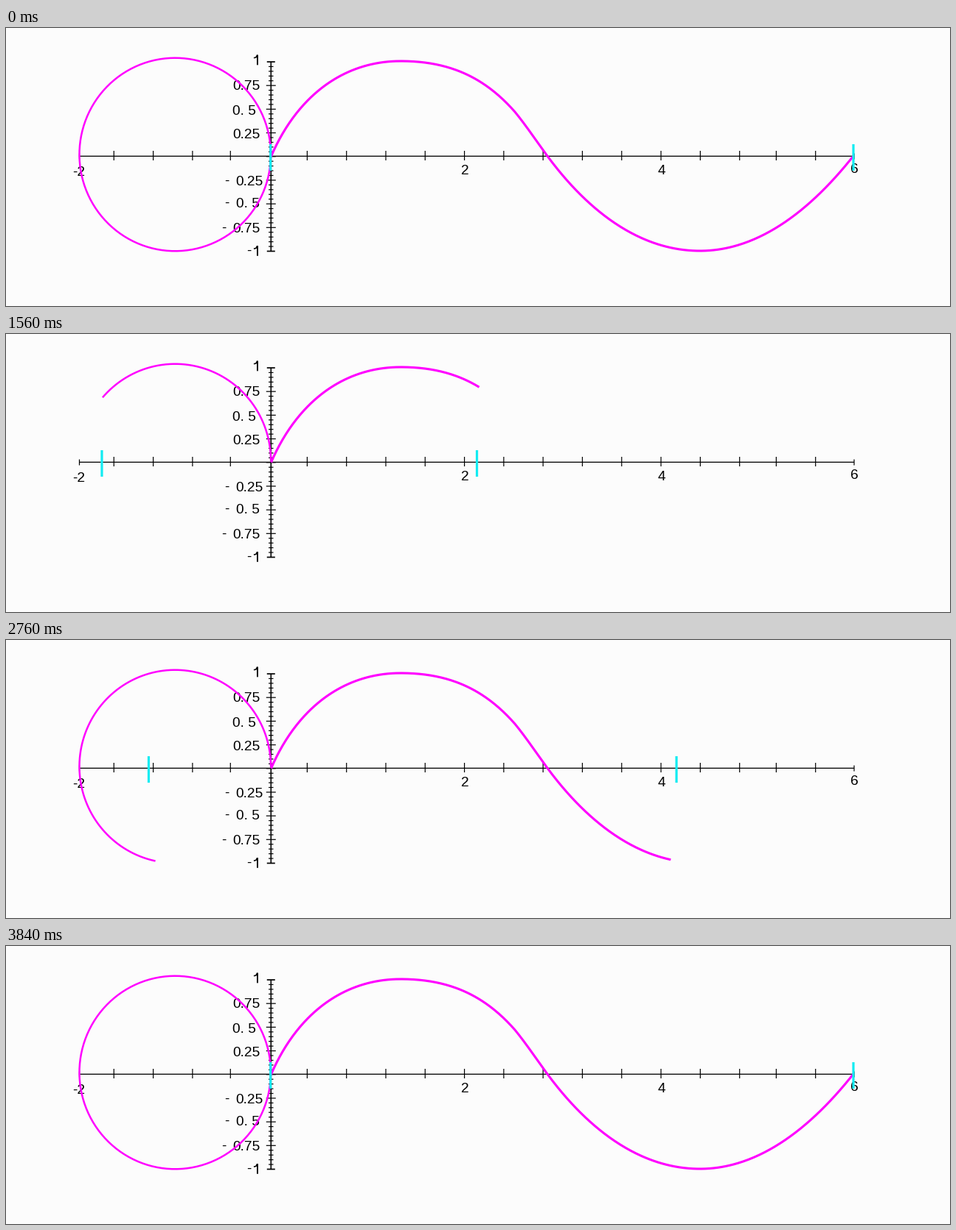
A matplotlib script that plays this animation: 1280 by 378 pixels, repeating every 3880 ms.

```python
import numpy as np
import matplotlib.pyplot as plt
from matplotlib.animation import FuncAnimation

W, H, DPI = 1280, 378, 100
PX = 72 / DPI
TICKS, TICK_MS = 97, 40
LAST = 43
BACK, INK, CURVE, MARK = "#fcfcfc", "black", "#ff00ff", "#12ecf2"
X0, Y0 = 359.3, 174.3

fig = plt.figure(figsize=(W / DPI, H / DPI), dpi=DPI, facecolor=BACK)
ax = fig.add_axes([0, 0, 1, 1])
ax.set_xlim(0, W)
ax.set_ylim(H, 0)
ax.axis("off")


def line(xs, ys, width, color=INK, z=2):
    return ax.plot(xs, ys, color=color, lw=width * PX, zorder=z, snap=False,
                   solid_capstyle="butt", solid_joinstyle="round")[0]


def label(x, y, s):
    ax.text(x, y, s, family="Liberation Sans", fontsize=19.2 * PX,
            color=INK, va="baseline", ha="left", zorder=3)


def one(x, base):
    """The digit 1 without a foot."""
    line([x - 5, x - 2, x - 0.3], [base - 9.6, base - 10.4, base - 13.6], 1.6)
    line([x, x], [base - 13.8, base], 1.9)


def bezier(a, b, c, d):
    t = np.linspace(0, 1, 120)[:, None]
    a, b, c, d = map(np.array, (a, b, c, d))
    return (1 - t)**3 * a + 3 * t * (1 - t)**2 * b + 3 * t**2 * (1 - t) * c + t**3 * d


# Horizontal axis, its ticks in evenly spaced runs
line([99, 1150], [Y0, Y0], 1.3)
for x in (99.5, 1150):
    line([x, x], [170.5, 178.5], 1.2)
for start, count in ((146.3, 3), (304.3, 1), (408.4, 12), (1044.4, 2)):
    for x in start + 53.3 * np.arange(count):
        line([x, x], [167, 180], 1.2)

# Vertical axis
line([X0, X0], [46, 303.5], 1.6)
for n in range(41):
    y = 46 + n * 257.5 / 40
    end = n % 40 == 0
    half = 5.5 if end else 6.5 if n % 5 == 0 else 3.2
    line([X0 - half, X0 + half], [y, y], 1.7 if end else 1.2)

# Labels
for s, x, base in (("0.75", 307, 84), ("0. 5", 307, 118), ("0.25", 307, 150),
                   ("-2", 90, 201), ("2", 617, 199), ("4", 883.5, 199),
                   ("6", 1145.5, 197)):
    label(x, base, s)
for s, x, base in (("0.25", 311.5, 214), ("0. 5", 311.5, 244), ("0.75", 307, 278)):
    label(x, base, s)
    label(x - 15, base - 1, "-")
label(326.5, 308, "-")
one(341, 50.3)
one(341, 309.8)

# Wave outline and its running length
wave = np.vstack([
    bezier((359.5, 174.5), (395, 92), (458, 45), (535, 45)),
    bezier((535, 45), (600, 45), (648, 66), (690, 114)),
    bezier((690, 114), (704, 131), (718, 152), (734, 174)),
    bezier((734, 174), (790, 250), (860, 303), (941, 303)),
    bezier((941, 303), (1015, 303), (1085, 255), (1149, 174)),
])
wx, wy = wave.T
length = np.r_[0, np.cumsum(np.hypot(np.diff(wx), np.diff(wy)))]

# The pen runs at an even pace along the wave between these steps
BEGIN = 0.6
pen_steps = (BEGIN, 10, 23, 39, LAST)
pen_length = np.interp((359.5, 485.5, 734, 1095, 1149), wx, length)

# Each step holds two ticks, every fifth or so holds three
steps = np.arange(1, LAST + 1)
starts = 2 * steps + 2 + np.floor((steps - 0.1) / 5.2)

circle_line = line([], [], 2.5, CURVE, 5)
wave_line = line([], [], 3.1, CURVE, 5)
left_mark = line([], [], 3.2, MARK, 6)
right_mark = line([], [], 3.2, MARK, 6)


def draw(i):
    k = int(np.sum(starts <= i)) or LAST
    turn = 2 * np.pi * (k - BEGIN) / (LAST - BEGIN)
    a = np.linspace(0, turn, 240)
    cx, cy = 229.3 + 129.8 * np.cos(a), 172 - 131.3 * np.sin(a)
    circle_line.set_data(cx, cy)

    reach = np.interp(k, pen_steps, pen_length)
    along = np.append(length[length < reach], reach)
    px, py = np.interp(along, length, wx), np.interp(along, length, wy)
    wave_line.set_data(px, py)

    # The markers drift slightly off the pens as they go round
    s = np.sin(turn)
    for mark, x in ((left_mark, cx[-1] - 0.4 + 3 * s * (1 - 2 * s)),
                    (right_mark, px[-1] + 2 * s * (s - 3))):
        mark.set_data([x, x], [158, 194])
    return circle_line, wave_line, left_mark, right_mark


anim = FuncAnimation(fig, draw, frames=TICKS, interval=TICK_MS,
                     repeat=True, repeat_delay=0, blit=False)
plt.show()
```
